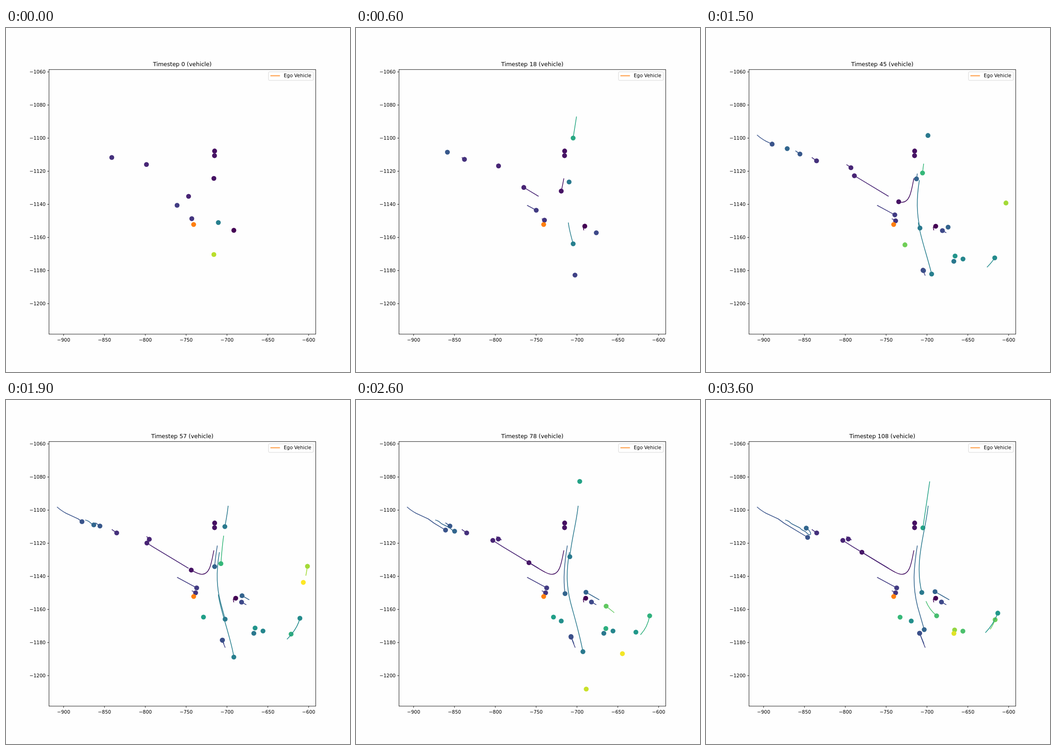
Recreate the animation shown at these times as an HTML page. Size 748x748 px, loop 3.7 s.

```html
<!DOCTYPE html>
<html lang="en">
<head>
<meta charset="utf-8">
<title>Vehicle tracks</title>
<style>
  html, body { margin: 0; width: 100%; height: 100%; overflow: hidden; background: #fefefe; }
  svg { display: block; width: 100vw; height: 100vh; }
  text { font: 10.39px "DejaVu Sans", Verdana, sans-serif; fill: #000; }
  #title { font-size: 12.47px; text-anchor: middle; }
  .axis { stroke: #000; stroke-width: 0.9; fill: none; }
  .xlabel { text-anchor: middle; }
  .ylabel { text-anchor: end; }
  .trail, .key { fill: none; stroke-width: 1.56; stroke-linejoin: round; }
</style>
</head>
<body>
<svg id="stage" viewBox="0 0 748 748">
  <g id="dots"></g>
  <g id="trails"></g>
  <g id="axes"><rect class="axis" x="93.5" y="90.3" width="580" height="575.4"/></g>
  <text id="title" x="383.5" y="83.4"></text>
  <rect x="570.8" y="95.3" width="97.3" height="18.6" rx="2.1" fill="#fff" fill-opacity=".8" stroke="#ccc" stroke-opacity=".8"/>
  <path class="key" stroke="#ff7f0e" d="M574.9 103.9H595.7"/>
  <text x="604" y="107.4">Ego Vehicle</text>
</svg>
<script>
const FRAME = 100, FRAMES = 37, STEP = 3, LAST = (FRAMES - 1) * STEP;
const VIRIDIS = ['440154', '482878', '3e4989', '31688e', '26828e', '1f9e89', '35b779', '6ece58', 'b5de2b', 'fde725'];
const byId = id => document.getElementById(id);
const cars = [];

function add(parent, tag, attrs, text = '') {
  const el = document.createElementNS('http://www.w3.org/2000/svg', tag);
  for (const name in attrs) el.setAttribute(name, attrs[name]);
  el.textContent = text;
  return byId(parent).appendChild(el);
}

// Colour map: 0 is dark purple, 1 is yellow.
function viridis(v) {
  const pos = v * (VIRIDIS.length - 1), i = Math.min(Math.floor(pos), VIRIDIS.length - 2);
  const channel = (hex, c) => parseInt(hex.substr(c * 2, 2), 16);
  const mix = c => {
    const from = channel(VIRIDIS[i], c);
    return Math.round(from + (channel(VIRIDIS[i + 1], c) - from) * (pos - i));
  };
  return `rgb(${[0, 1, 2].map(mix)})`;
}

// A car follows its path from `start` to `stop` while its speed falls
// evenly from 1 + brake to 1 - brake, then rests until `end`.
function drive(color, start, stop, brake, d, end = LAST) {
  const fill = typeof color === 'number' ? viridis(color) : color;
  const dot = add('dots', 'circle', { r: 5.3, fill });
  const trail = add('trails', 'path', { class: 'trail', stroke: fill, d });
  cars.push({ start, stop, brake, end, dot, trail, total: trail.getTotalLength() });
}

const park = (color, x, y, start = 0, end = LAST) =>
  drive(color, start, start + 1, 0, `M${x} ${y}h.1`, end);

// Cars at the junction from the beginning
drive(0, 0, 24, .5, 'M495.4 439.9L494.2 434Q495 430.3 499.5 431');
park(.04, 453.6, 267.4);
park(.05, 453.4, 277.6);
drive(.05, 0, LAST, .05, 'M452 327C447 352 444 379 426 379C416 379 405 371 376.5 354L339 331');
drive(.1, 0, 64, .2, 'M397 366L319 319 297.5 305.3');
drive(.105, 0, 64, 0, 'M305.4 296.8L316 304 309.5 302.3');
drive(.14, 0, 50, .8, 'M230 281.5L240.7 289');
drive(.155, 0, 40, 1, 'M404 414.6L412.3 419.2');
drive(.18, 0, 57, .7, 'M372 385.5L414.6 408.5');
drive(.43, 0, 55, .05, 'M461.7 423C465 455 490 520 495.4 559', 60);
park(.895, 452, 492.5, 0, 3);

// Through traffic and slow queues
drive(.6, 4, 24, .17, 'M479.5 192.5L469.5 256', 24);
drive(.275, 9, 45, 1, 'M194.5 267L204.3 274', 84);
drive(.2, 15, LAST, .27, 'M476.7 538.5L473 529.5 464.5 507.3');
drive(.222, 18, 60, .7, 'M522.5 445.3L512 439.3');
drive(.405, 17, 84, .07, 'M464 331C456 378 459 410 466 438S488 512 497 567', 84);
drive(.26, 29, LAST, .6, 'M111 232.5Q119 240 131 246.5L157 258.5 170 268 221 298.7');
drive(.48, 37, 60, .45, 'M611 520.3Q636 495 640 470', 60);
drive(.667, 39, 63, 0, 'M473.3 295Q469 325 466 376', 63);
drive(.25, 40, LAST, .5, 'M474 530L464.5 507');
drive(.32, 41, LAST, .05, 'M459.5 316.5C451 370 449 405 460 449L474.5 499.3');
drive(.325, 42, LAST, .2, 'M172.3 261Q179 262 186 269L204 278 208 282 216 286 222 292C231 296 229 286 218 278.6');
drive(.315, 43, 90, 1, 'M529 434.5L498 416.8');
drive(.405, 44, LAST, .23, 'M483 230C478 285 452 350 469.3 418.5');
drive(.86, 44, 57, 0, 'M652 382L655.5 361.5', 60);
drive(.64, 56, 81, 0, 'M618.5 510.5Q636 492 639.5 463', 81);
drive(.75, 69, 81, 0, 'M561.5 462.5L538 443.5', 81);
drive(.53, 77, LAST, 0, 'M607.5 506Q625 488 634.5 463.4');
drive(.575, 78, LAST, 0, 'M486.5 177L471.6 278');
drive(.7, 87, LAST, .4, 'M478.3 437.5Q485 455 501.5 469.2');
drive(.67, 90, LAST, 0, 'M425.6 474L422 472.3');
drive(.77, 93, LAST, 0, 'M618 498.5Q624 490 628.7 477.8');

// Parked cars and brief sightings
park(.515, 541.5, 495.7, 42, 66);
park(.4, 538.8, 507.3, 42, 84);
park(.46, 558.7, 502.3, 42, 84);
park(.78, 432.6, 471.4, 45, 48);
park(.56, 429.3, 472, 54, 84);
park(1, 646.5, 396.6, 57, 57);
park(.495, 446.2, 480.5, 72);
park(.625, 543.2, 496.9, 72, 99);
park(.92, 500.5, 628.5, 72, 78);
park(.985, 579.3, 551.6, 78, 78);
park(.71, 558.5, 502.6, 90);
park(.835, 540.5, 500, 105);
park(.955, 539, 507.5, 105);
park('#ff7f0e', 408, 427.3);

for (let i = 0; i < 7; i++) {
  const x = 125.3 + i * 88.8;
  add('axes', 'path', { class: 'axis', d: `M${x} 665.7v3.7` });
  add('axes', 'text', { class: 'xlabel', x, y: 681.5 }, '\u2212' + (900 - i * 50));
}
for (let i = 0; i < 8; i++) {
  const y = 95.5 + i * 71.98;
  add('axes', 'path', { class: 'axis', d: `M93.5 ${y}h-3.7` });
  add('axes', 'text', { class: 'ylabel', x: 86.2, y: y + 3.8 }, '\u2212' + (1060 + i * 20));
}

function draw(step) {
  byId('title').textContent = `Timestep ${step} (vehicle)`;
  for (const { start, stop, brake, end, dot, trail, total } of cars) {
    const shown = step >= start && step <= end;
    dot.style.visibility = trail.style.visibility = shown ? 'visible' : 'hidden';
    if (!shown) continue;
    const u = Math.min(1, (step - start) / (stop - start));
    const run = total * u * (1 + brake * (1 - u));
    const { x, y } = trail.getPointAtLength(run);
    dot.setAttribute('cx', x);
    dot.setAttribute('cy', y);
    trail.setAttribute('stroke-dasharray', `${run} 999`);
  }
}

let current = -1;
const origin = performance.now();
function tick() {
  const frame = Math.floor((performance.now() - origin) / FRAME) % FRAMES;
  if (frame !== current) draw((current = frame) * STEP);
  requestAnimationFrame(tick);
}
tick();
</script>
</body>
</html>
```
